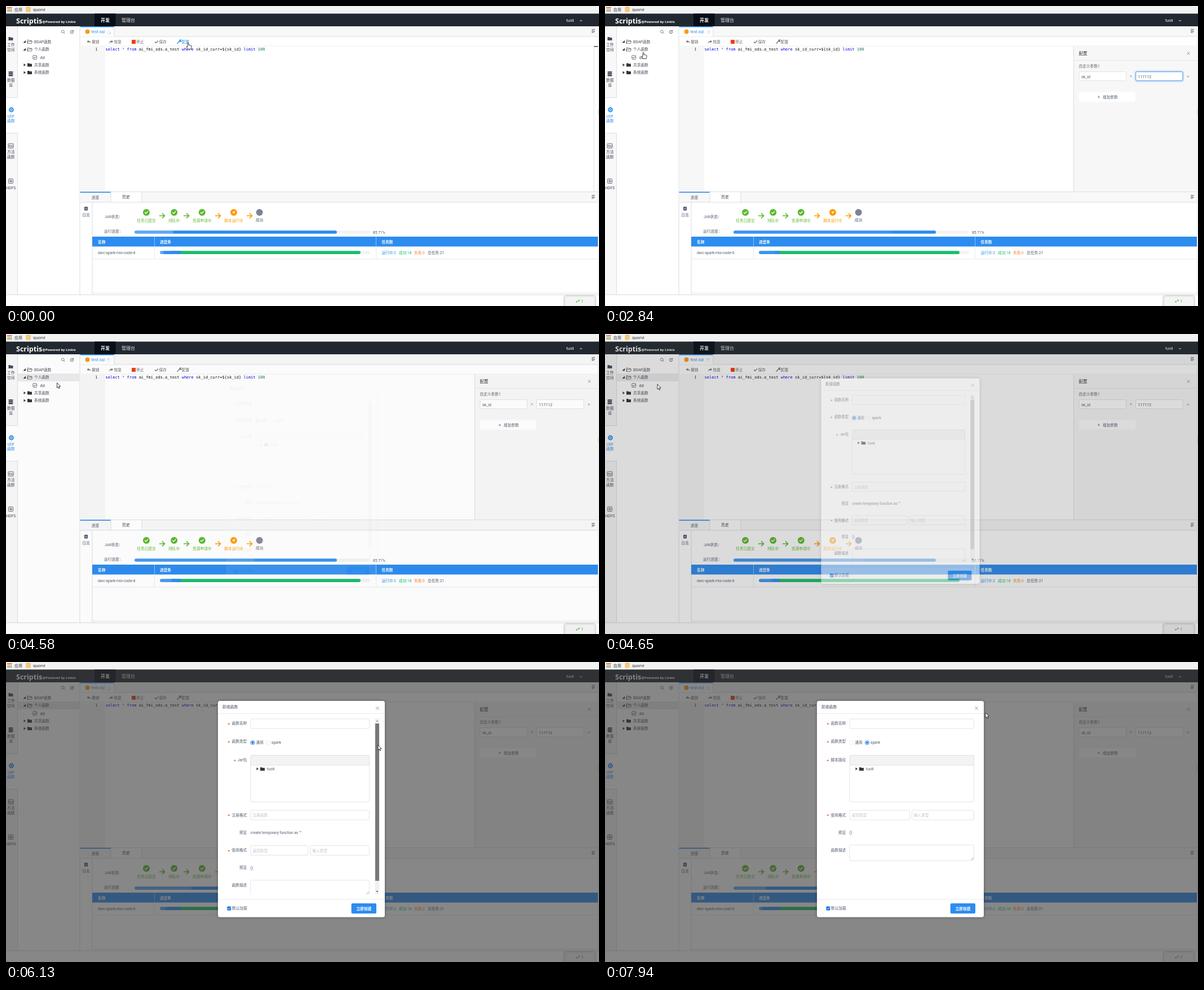
An HTML page with a canvas that plays this animation: 1052x532 px, repeating every 8 s.

```html
<!DOCTYPE html>
<html lang="zh">
<head>
<meta charset="utf-8">
<style>
html, body { margin: 0; width: 100%; height: 100%; overflow: hidden; background: #fff; }
canvas { position: absolute; left: 0; top: 0; width: 1052px; height: 532px; }
</style>
</head>
<body>
<script>
const W = 1052, H = 532, LOOP = 8000, STEP = 78.7;
const SANS = 'Roboto, "Noto Sans CJK SC", "Noto Sans CJK", sans-serif';
const BRAND = '"Open Sans", "Noto Sans", sans-serif';
const MONO = '"DejaVu Sans Mono", monospace';
const BLUE = '#2d8cf0', GREEN = '#5cb82e', ORANGE = '#ff9900', INK = '#515a6e', LINE = '#dcdee2', PALE = '#f8f8f9';
const USER = 'tuoli', BOOKMARK = 'quorvi';

const dpr = window.devicePixelRatio || 1;
const layers = [0, 1, 2].map(() => {
  const c = document.createElement('canvas');
  c.width = W * dpr;
  c.height = H * dpr;
  document.body.append(c);
  return c.getContext('2d');
});
const [page, dialog, pointer] = layers;
let g = page;

const clamp = v => Math.max(0, Math.min(1, v));
const smooth = v => v * v * (3 - 2 * v);
const within = (t, a, b) => t >= a && t < b;

// Drawing helpers work on the current layer; text is placed by its vertical centre.
function text(s, x, y, color = INK, size = 6.7, o = {}) {
  g.font = `${o.weight || 400} ${size}px ${o.font || SANS}`;
  g.textAlign = o.align || 'left';
  g.fillStyle = color;
  g.fillText(s, x, y + size * 0.37);
  return g.measureText(s).width;
}
const center = (s, x, y, color, size, weight) => text(s, x, y, color, size, { align: 'center', weight });
function rect(x, y, w, h, color) {
  g.fillStyle = color;
  g.fillRect(x, y, w, h);
}
const hline = (x1, x2, y, color = LINE) => rect(x1, y, x2 - x1, 1, color);
const vline = (x, y1, y2, color = LINE) => rect(x, y1, 1, y2 - y1, color);
function box(x, y, w, h, fill, stroke, r = 2) {
  g.beginPath();
  g.roundRect(x, y, w, h, r);
  if (fill) { g.fillStyle = fill; g.fill(); }
  if (stroke) { g.strokeStyle = stroke; g.lineWidth = 0.8; g.stroke(); }
}
function dot(x, y, r, color) {
  g.beginPath();
  g.arc(x, y, r, 0, 7);
  g.fillStyle = color;
  g.fill();
}
function ring(x, y, r, color, w = 0.9, from = 0, to = 6.2832) {
  g.beginPath();
  g.arc(x, y, r, from, to);
  g.strokeStyle = color;
  g.lineWidth = w;
  g.stroke();
}
function path(d, x, y, o) {
  g.save();
  g.translate(x, y);
  const p = new Path2D(d);
  if (o.fill) { g.fillStyle = o.fill; g.fill(p); }
  if (o.stroke) { g.strokeStyle = o.stroke; g.lineWidth = o.w || 1; g.stroke(p); }
  g.restore();
}
function shadowed(draw, blur, color) {
  g.save();
  g.shadowBlur = blur * dpr;
  g.shadowColor = color;
  draw();
  g.restore();
}

const cross = (x, y, r, color) => path(`M${-r} ${-r}L${r} ${r}M${r} ${-r}L${-r} ${r}`, x, y, { stroke: color, w: 0.8 });
const check = (x, y, color, k = 1) => path(`M${-3 * k} 0L${-k} ${2 * k}L${3 * k} ${-2 * k}`, x, y, { stroke: color, w: 1.3 * k });
const folder = (x, y, color) => path('M-4-3H-1L0-2H4V3H-4Z', x, y, { fill: color });
const folderOpen = (x, y) => path('M-4 3V-3H-1L0-2H3.5V-.6M-4 3L-3-.6H4.4L3.5 3Z', x, y, { stroke: '#444', w: 0.7 });
const arrowRight = (x, y, color) => path('M-5 0H4M0-4.5L4.5 0L0 4.5', x, y, { stroke: color, w: 1.7 });
const menuIcon = (x, y) => path('M-3-2.5H3M-3-.5H2M-3 1.5H3M-3 3H1', x, y, { stroke: '#555', w: 0.8 });
function tick(x, y, on) {
  box(x - 3.4, y - 3.4, 6.8, 6.8, on ? '#1a73e8' : '#fff', on ? null : '#555', 1);
  check(x, y, on ? '#fff' : '#333', 0.75);
}
const field = (x1, x2, y, h = 17) => box(x1 + 0.5, y + 0.5, x2 - x1 - 1, h - 1, '#fff', LINE);

function drawHeader() {
  rect(0, 0, W, 13.5, '#f2f2f2');
  const tints = ['#ea4335', '#f29b2e', '#34a853'];
  for (let i = 0; i < 9; i++) rect(2.5 + i % 3 * 2.8, 2 + (i / 3 | 0) * 2.8, 2, 2, tints[(i / 3 | 0)]);
  text('应用', 15, 6, '#333', 7);
  box(36, 2, 7, 8, '#f8cb74', '#e6b04c', 1);
  text(BOOKMARK, 48, 6, '#333', 7.8);

  rect(0, 13.5, W, 22.5, '#22282f');
  rect(157, 13.5, 37.5, 22.5, '#060d16');
  text('Scriptis', 18, 26, '#fff', 12.5, { weight: 700, font: BRAND });
  text('@Powered by Linkis', 64.5, 28, '#fff', 6, { weight: 700, font: BRAND });
  center('开发', 176, 25, '#fff', 8, 700);
  center('管理台', 217, 25, '#e4e6e8', 8);
  text(USER, 994, 25, '#fff', 7);
  path('M-2-1L0 1L2-1', 1020, 26, { stroke: '#fff', w: 0.9 });
}

function drawSidebar() {
  rect(0, 36, 21, 476, PALE);
  vline(20, 36, 512);
  rect(0, 162, 21, 64, '#fff');
  hline(0, 21, 162);
  hline(0, 21, 225);
  const ink = '#464c5b';
  folder(8.5, 58, ink);
  for (let i = 0; i < 3; i++) box(4.5, 116 + i * 3, 8, 2.4, ink, null, 1.2);
  dot(9.5, 184, 4.4, BLUE);
  ring(9.5, 184, 2, '#fff', 1);
  box(4, 244, 9, 8, null, ink, 1);
  center('f(x)', 8.5, 248, ink, 4.5, 700);
  box(4.5, 306.5, 8, 8, null, ink, 1);
  path('M-2-2H0V0H-2ZM1-2H2V2H-2V1H1Z', 8.5, 310.5, { fill: ink });
  [['工作', 68], ['空间', 77], ['数据', 131], ['库', 140], ['UDF', 195, BLUE], ['函数', 203.5, BLUE],
   ['方法', 258.5], ['函数', 267], ['HDFS', 322]].forEach(([s, y, c]) => center(s, 8.8, y, c || ink, 6.8));
}

function drawTree(selected) {
  vline(130.5, 36, 512);
  ring(100.8, 45.3, 2.4, '#777', 0.9);
  path('M0 0L2 2', 102.5, 47, { stroke: '#777' });
  ring(117, 46, 2.5, '#555', 1, 0, 5);
  path('M0-1.5V1.5H-3Z', 119.8, 43.8, { fill: '#555' });
  if (selected) rect(21, 70, 109.5, 14, '#ececee');
  [['BDAP函数', 63.3, 1], ['个人函数', 77, 1], ['共享函数', 104.5, 0], ['系统函数', 118, 0]].forEach(([s, y, open]) => {
    path(open ? 'M2-2.5V2H-2.5Z' : 'M-1.5-2.5L2 0L-1.5 2.5Z', 33, y, { fill: '#333' });
    if (open) folderOpen(42, y); else folder(42, y, '#333');
    text(s, 50, y, '#464c5b', 6.7);
  });
  tick(51.2, 91, false);
  text('dd', 60.5, 91, '#464c5b', 7.4);
}

function drawEditor(t) {
  rect(131.5, 36, 920, 18, PALE);
  hline(131.5, 1051, 53.5);
  rect(132, 36, 59.5, 18, '#fff');
  rect(131.5, 36, 60, 1.6, BLUE);
  vline(191.5, 37, 54);
  dot(144.5, 45.5, 4, '#f99b1c');
  text('test.sql', 151.5, 45.7, BLUE, 7.2);
  ring(182.5, 46.5, 2.8, '#ddd', 0.7);
  ring(182.5, 46.5, 2.8, '#9aa5b1', 0.8, t / 160, t / 160 + 1.6);
  menuIcon(1042, 44);

  const grey = '#777';
  const curl = 'M-3.5-.5L-.5-3V-1.5C2-1.5 3.5 0 3.5 3C2.5 1 1.5 .6-.5 .6V2Z';
  path(curl, 147, 63.5, { fill: grey });
  g.save();
  g.translate(186.5, 63.5);
  g.scale(-1, 1);
  path(curl, 0, 0, { fill: grey });
  g.restore();
  rect(223, 60, 7, 7, '#f23c12');
  check(267, 63.5, grey, 1);
  const tool = t < 500 ? BLUE : grey;
  path('M-3.5 3L1-1.5M1-1.5A2 2 0 0 1 3.2-3.8L2-1.8L3.8-1.2A2 2 0 0 1 1-1.5', 307, 63.7, { stroke: tool, w: 1.4 });
  [['撤销', 152], ['恢复', 191.5], ['停止', 231], ['保存', 271.5]].forEach(([s, x]) => text(s, x, 63, '#666', 6.8));
  text('配置', 311.7, 63, t < 500 ? BLUE : '#666', 6.8);
  hline(131.5, 1051, 70.5, '#f0f0f0');

  rect(131.5, 71, 44.5, 258, '#f7f7f7');
  text('1', 158.2, 76.7, '#333', 7, { font: MONO });
  let x = 176.5;
  [['select', '#0000e0'], [' * ', '#667'], ['from', '#0000e0'], [' ai_fmi_ods.a_test ', '#111'], ['where', '#0000e0'],
   [' sk_id_curr=${sk_id} ', '#111'], ['limit', '#0000e0'], [' 100', '#09764e']].forEach(([s, c]) => {
    x += text(s, x, 76.5, c, 7.02, { font: MONO });
  });
  vline(1042.5, 71, 329, '#e4e4e4');
  rect(1043, 71, 8, 1.5, '#444');
}

function drawConfig(t) {
  const p = clamp((t - 220) / 320);
  if (p <= 0) return;
  g.save();
  g.beginPath();
  g.rect(831, 71, 220, 258);
  g.clip();
  g.translate(220 * (1 - p) ** 2, 0);
  rect(831, 71, 220, 258, '#f7f7f7');
  vline(831, 71, 329);
  text('配置', 840.5, 84, '#333', 7.6, { weight: 500 });
  cross(1035, 84, 2.6, '#888');
  hline(831, 1051, 96, '#e3e5e8');
  text('自定义参数1', 840.5, 106.3, '#666', 6.7);
  field(840.5, 925, 116);
  text('sk_id', 845, 125, INK, 7);
  center('=', 933, 124.5, INK, 7);
  if (within(t, 1640, 3250)) shadowed(() => box(941.5, 116.5, 83.5, 16, '#fff', '#57a3f3'), 3, 'rgba(45,140,240,.7)');
  else field(941, 1025.5, 116);
  text('117112', 945.5, 125, INK, 7);
  cross(1034, 125, 1.5, '#888');
  box(841, 152.5, 100, 17, '#fff');
  center('+', 876, 161, INK, 8);
  text('增加参数', 883, 161.3, INK, 6.7);
  g.restore();
}

function sheen(x, w, y, h, t) {
  const k = smooth((t / 2000 + 0.28) % 1);
  box(x, y, w * k, h, `rgba(255,255,255,${0.3 * (1 - k)})`, null, h / 2);
}

function drawJobs(t) {
  rect(131.5, 329, 920, 19, PALE);
  hline(131.5, 1051, 329);
  rect(186, 330, 55, 18, '#fff');
  rect(131.5, 329.5, 54.5, 1.6, BLUE);
  vline(185.5, 330, 348);
  vline(240.5, 330, 348);
  hline(131.5, 1051, 347.5);
  center('进度', 158.5, 339, INK, 6.8);
  center('历史', 213, 338.5, '#333', 6.8);
  menuIcon(1042, 338);
  vline(152.5, 348, 511);
  box(139, 356, 6, 6.5, '#3e4a66', null, 1);
  path('M-1.7-1H1.7M-1.7 1H1.7', 142, 359.2, { stroke: '#fff', w: 0.8 });
  center('日志', 142, 370, INK, 6.8);

  text('Job状态：', 175, 373, INK, 6.8);
  [['任务已提交', 249], ['排队中', 298.2], ['资源申请中', 347.8]].forEach(([s, x]) => {
    dot(x, 366, 6, GREEN);
    check(x, 366, '#fff');
    center(s, x, 381, GREEN, 6.7);
  });
  dot(404, 366, 6, ORANGE);
  path('M3-3L-3 0L-.3 .4L.3 3Z', 403.7, 366.2, { fill: '#fff' });
  center('脚本运行中', 404, 381, ORANGE, 6.7);
  dot(449.7, 366, 6, '#808294');
  center('成功', 449.7, 380, INK, 6.7);
  [277, 320, 376, 432].forEach((x, i) => arrowRight(x, 372, i < 2 ? GREEN : ORANGE));

  text('运行进度：', 174, 400, INK, 6.7);
  box(228, 398.2, 418, 5.6, '#f3f3f3', null, 3);
  box(228, 398.2, 359, 5.6, BLUE, null, 3);
  sheen(228, 359, 398.2, 5.6, t);
  text('85.71%', 651, 401.3, INK, 6.7);

  rect(153, 409, 897.5, 17.5, BLUE);
  [263, 656].forEach(x => {
    vline(x, 409, 426.5, '#8cc0f7');
    vline(x, 426.5, 448, '#e8eaec');
  });
  [['名称', 163], ['进度条', 273], ['任务数', 666.5]].forEach(([s, x]) => text(s, x, 418.3, '#fff', 6.7, { weight: 700 }));
  text('dwc-spark-mix-code-6', 163, 437.3, INK, 6.8);
  box(273, 434.2, 373, 5.8, '#f3f3f3', null, 3);
  box(290, 434.2, 339, 5.8, '#19be6b', null, 3);
  box(273, 434.2, 37, 5.8, BLUE, null, [3, 0, 0, 3]);
  sheen(273, 37, 434.2, 5.8, t);
  [['运行中:2', 666.5, BLUE], ['成功:18', 697, '#19be6b'], ['失败:0', 724, '#f5802a'], ['总任务:21', 748, INK]]
    .forEach(([s, x, c]) => text(s, x, 437.3, c, 6.7));
  hline(153, 1050, 448, '#e8eaec');
  hline(153, 1050, 508.5, '#e3e5e8');
  vline(1050, 36, 512, '#e3e5e8');
  rect(1050, 183, 2, 10, '#ddd');

  hline(0, W, 511.5, '#d5d8dc');
  shadowed(() => box(990.5, 514, 55, 22, '#f4f4f4', '#d5d5d5', 3), 3, 'rgba(0,0,0,.2)');
  path('M3-2L0 1H-2.5M-1-.5L-2.5 1L-1 2.3M1-2H3V0', 1014, 523.5, { stroke: '#4fae3c', w: 0.9 });
  text('1', 1020.5, 523.5, '#4a9c3a', 7);
}

function drawMenu() {
  shadowed(() => box(66, 75, 98, 53, '#fff', null, 2), 4, 'rgba(0,0,0,.35)');
  rect(66, 77, 98, 13, '#f0f0f0');
  text('新增函数', 73, 83.3, '#9a9a9a', 6.7);
  text('新增文件夹', 73, 98.5, INK, 6.7);
  hline(73, 157, 108, '#e8e8e8');
  text('刷新', 73, 119.5, INK, 6.7);
}

function label(s, y, required = true) {
  const w = text(s, 427.3, y, INK, 6.7, { align: 'right' });
  if (required) text('*', 424 - w, y + 1.2, '#ed4014', 8, { align: 'right', weight: 700 });
}
const hint = (s, x, y) => text(s, x, y, '#c0c4cc', 6.7);

function drawForm(spark, scroll) {
  const right = spark ? 655 : 645;
  g.save();
  g.beginPath();
  g.rect(376, 92, 296, 320);
  g.clip();
  g.translate(0, -scroll);
  label('函数名称', 109);
  field(433.5, right, 100.5, 18);
  label('函数类型', 140.8);
  [437.6, 465].forEach((x, i) => {
    const on = (i === 1) === spark;
    ring(x, 143, 3.6, on ? '#1a73e8' : '#ddd', on ? 0.9 : 0.6);
    if (on) dot(x, 143, 2.1, '#1a73e8');
  });
  text('通用', 443.5, 142.8, INK, 6.7);
  text('spark', 470.8, 142.5, INK, 7);
  label(spark ? '脚本路径' : 'Jar包', 173.5);
  field(433.5, right, 165, 83.5);
  box(434, 165.5, right - 434.5, 17.5, '#f3f3f3', LINE);
  path('M-1.5-2.5L2 0L-1.5 2.5Z', 446, 189.5, { fill: '#333' });
  folder(455, 189.7, '#333');
  text(USER, 463, 189.5, INK, 7);

  let y = 271.3;
  if (!spark) {
    label('注册格式', y);
    field(433.5, right, y - 8.8, 18);
    hint('注册函数', 437.5, y + 0.5);
    label('预览', y + 31, false);
    text('create temporary function as ""', 433.8, y + 31.3, INK, 6.6);
    y += 62.5;
  }
  const mid = spark ? 541 : 536.5;
  label('使用格式', y);
  field(433.5, mid, y - 8.8, 18);
  field(mid + 3, right, y - 8.8, 18);
  hint('返回类型', 437.5, y + 0.5);
  hint('输入类型', mid + 7, y + 0.5);
  label('预览', y + 31, false);
  text('()', 433.8, y + 31.3, INK, 6.7);
  label('函数描述', y + 62, false);
  field(433.5, right, y + 52.7, 29);
  path('M0-4L-4 0M0-2L-2 0', right - 1.5, y + (spark ? 79.5 : 77.5), { stroke: '#777', w: 0.6 });
  g.restore();
}

function drawDialog(t) {
  const spark = t >= 7250;
  const drag = t < 6450 ? smooth(clamp((t - 6130) / 320)) : 1 - smooth(clamp((t - 6450) / 350));
  shadowed(() => box(376, 69, 296, 383.5, '#fff', null, 3.5), 5, 'rgba(0,0,0,.35)');
  text('新增函数', 384, 79.8, '#464c5b', 6.8);
  cross(659, 82, 2.8, '#888');
  hline(376, 672, 91, '#e8eaec');
  drawForm(spark, drag * 15);
  if (!spark) {
    rect(654.5, 100, 8, 312, '#f1f1f1');
    path('M-2 1L0-1L2 1Z', 658.5, 104.5, { fill: '#777' });
    path('M-2-1L0 1L2-1Z', 658.5, 407, { fill: '#333' });
    rect(655, 109 + drag * 14, 7, 279, within(t, 6100, 6830) ? '#787878' : '#c1c1c1');
  }
  hline(376, 672, 420.5, '#e8eaec');
  tick(395.8, 437, true);
  text('默认加载', 401, 436.7, INK, 6.7);
  box(612.7, 428, 44.3, 18, BLUE, null, 2);
  center('立即创建', 635, 437.4, '#fff', 6.7, 700);
}

// Pointer stops: time, x, y of the hot spot.
const stops = [
  [0, 323, 65], [350, 323, 66], [900, 640, 90], [1450, 975, 122], [1850, 975, 122], [2250, 560, 108],
  [2600, 84, 88], [2840, 68, 82], [3100, 66, 75], [3350, 68, 76], [3630, 87, 92], [4050, 90, 86],
  [4480, 88, 84], [4650, 93, 89], [4820, 112, 94], [5290, 330, 120], [5800, 674, 140], [6130, 660, 147],
  [6450, 660, 161], [6800, 660, 147], [7150, 464, 142], [7400, 464, 142], [7780, 640, 105], [7940, 675, 90], [8000, 675, 90]
];

function drawPointer(t) {
  const i = Math.max(1, stops.findIndex(s => s[0] > t));
  const [t0, x0, y0] = stops[i - 1], [t1, x1, y1] = stops[i];
  const k = smooth(clamp((t - t0) / (t1 - t0)));
  const x = x0 + (x1 - x0) * k, y = y0 + (y1 - y0) * k;
  if (t < 450 || within(t, 2600, 4560)) {
    path('M-1 7V1Q0-.6 1 1V4.5Q2 3.5 3 4.8Q4 4 4.6 5.2Q6 4.6 6 6.2V8.5L5 11.5H-.4L-3 7.8Q-2.8 6-1 7.6Z', x, y,
      { fill: '#fff', stroke: '#111', w: 0.8 });
  } else if (within(t, 1400, 2000)) {
    path('M-1.5-4H1.5M0-4V4M-1.5 4H1.5', x, y, { stroke: '#222', w: 0.8 });
  } else {
    path('M0 0V9L2 7.1L3.4 10.3L4.9 9.6L3.5 6.6H6.2Z', x, y, { fill: '#fff', stroke: '#111', w: 0.8 });
  }
}

function render(t) {
  layers.forEach(c => {
    c.setTransform(dpr, 0, 0, dpr, 0, 0);
    c.clearRect(0, 0, W, H);
  });
  g = page;
  rect(0, 0, W, H, '#fff');
  drawHeader();
  drawSidebar();
  drawTree(t >= 3150);
  drawEditor(t);
  drawConfig(t);
  drawJobs(t);
  if (within(t, 3200, 4540)) drawMenu();

  const p = clamp((t - 4555) / 300);
  if (p > 0) {
    rect(0, 13.5, W, H, `rgba(55,55,55,${0.6 * p})`);
    g = dialog;
    const k = 1 - (1 - p) ** 2, s = 0.9 + 0.1 * k;
    g.canvas.style.opacity = k;
    g.translate(524, 260.7);
    g.scale(s, s);
    g.translate(-524, -260.7);
    drawDialog(t);
  }
  g = pointer;
  drawPointer(t);
}

// The screen refreshes in even ticks, about 12.7 per second.
const start = performance.now();
let last = -1;
function tickFrame() {
  const n = Math.floor(((performance.now() - start) % LOOP + 10) / STEP);
  if (n !== last) {
    last = n;
    render(n * STEP);
  }
  requestAnimationFrame(tickFrame);
}
tickFrame();
</script>
</body>
</html>
```
